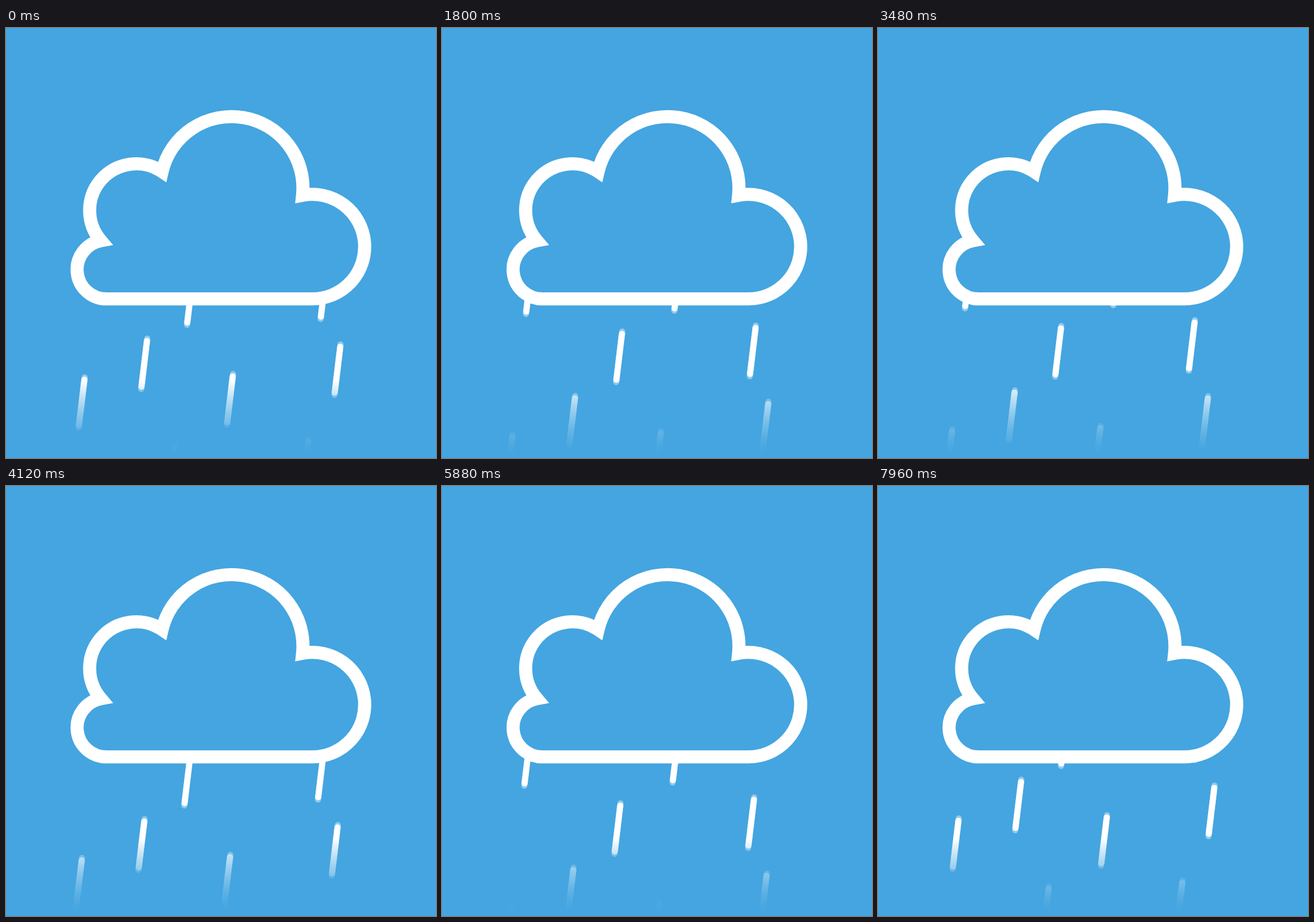
An HTML page for the animation above (8000 ms loop, 732 px wide and 732 px high).

```html
<!DOCTYPE html>
<html lang="en">
<head>
<meta charset="utf-8">
<title>Rain cloud</title>
<style>
  html, body { margin: 0; width: 100%; height: 100%; overflow: hidden; background: #44a5e0; }
  svg { display: block; width: 732px; height: 732px; }
  path { fill: none; stroke: #fff; }
  .drops path { stroke-width: 10.5; stroke-linecap: round; }
  #cloud { stroke-width: 22.3; stroke-miterlimit: 6; }
</style>
</head>
<body>
<svg viewBox="0 0 732 732">
  <defs>
    <clipPath id="below"><rect y="461" width="732" height="271"/></clipPath>
    <linearGradient id="fade" x1="0" y1="0" x2="0" y2="1"></linearGradient>
  </defs>
  <g class="drops" clip-path="url(#below)"></g>
  <rect y="600" width="732" height="125" fill="url(#fade)"/>
  <rect y="725" width="732" height="7" fill="#44a5e0"/>
  <path id="cloud"/>
</svg>
<script>
const NS = 'http://www.w3.org/2000/svg';
const LOOP = 8000, STEP = 40;

// Rain: bursts of five showers, each shower a copy of the same six drops
const CYCLE = 4018, FIRST = 3005, GAP = 771;
const SPEED = 0.378, SLANT = 0.12, LENGTH = 82, CAP = 5.25, SMEAR = 2;
const LEFT = 140.7, SHIFT = [7, 4, 0, 2, 0];
const DROPS = [[0, 0], [106.5, -66], [153.5, 116], [252.5, -5.5], [381, 106], [435.5, -56]];

// Cloud lobes, clockwise: centre x, centre y, radius
const LOBES = [[171, 411.2, 50], [221.7, 310.5, 79.3], [384, 272.3, 121.5], [521.6, 372.2, 89]];

function add(parent, name, attrs = {}) {
  const el = document.createElementNS(NS, name);
  for (const key in attrs) el.setAttribute(key, attrs[key]);
  return parent.appendChild(el);
}

// Outer crossing point of two neighbouring lobes
function crossing([x1, y1, r1], [x2, y2, r2]) {
  const d = Math.hypot(x2 - x1, y2 - y1);
  const ux = (x2 - x1) / d, uy = (y2 - y1) / d;
  const a = (d * d + r1 * r1 - r2 * r2) / (2 * d);
  const h = Math.sqrt(r1 * r1 - a * a);
  return [x1 + ux * a + uy * h, y1 + uy * a - ux * h];
}

function cloudPath() {
  const foot = ([x, y, r]) => [x, y + r];
  let from = foot(LOBES[0]);
  let d = `M${from}`;
  LOBES.forEach((lobe, i) => {
    const next = LOBES[i + 1];
    const to = next ? crossing(lobe, next) : foot(lobe);
    const [x, y, r] = lobe;
    const turn = Math.atan2(to[1] - y, to[0] - x) - Math.atan2(from[1] - y, from[0] - x);
    const sweep = (turn + 4 * Math.PI) % (2 * Math.PI);
    d += `A${r} ${r} 0 ${sweep > Math.PI ? 1 : 0} 1 ${to}`;
    from = to;
  });
  return d + 'Z';
}

// Slanted strokes, lengthened by grow at both ends
function showerPath(grow) {
  const len = LENGTH + 2 * grow;
  return DROPS.map(([x, y]) =>
    `M${x + grow * SLANT} ${y + CAP - grow}l${-len * SLANT} ${len}`).join('');
}

document.getElementById('cloud').setAttribute('d', cloudPath());

const fade = document.getElementById('fade');
for (let u = 0; u <= 1; u += 0.125) {
  add(fade, 'stop', { offset: u, 'stop-color': '#44a5e0', 'stop-opacity': 1 - (1 - u) ** 1.5 });
}

const rain = document.querySelector('.drops');
const showers = [];
for (let cycle = -1; cycle <= 1; cycle++) {
  SHIFT.forEach((shift, i) => {
    const g = add(rain, 'g');
    add(g, 'path', { d: showerPath(SMEAR), opacity: 0.4 });
    add(g, 'path', { d: showerPath(-SMEAR) });
    showers.push({ g, x: LEFT + shift, time: FIRST + cycle * CYCLE + i * GAP });
  });
}

function draw(t) {
  for (const { g, x, time } of showers) {
    const fall = (t - time) * SPEED;
    g.setAttribute('transform', `translate(${x - fall * SLANT} ${500 + fall})`);
  }
}

const start = performance.now();
function tick() {
  const t = (performance.now() - start) % LOOP;
  draw(Math.floor(t / STEP) * STEP);
  requestAnimationFrame(tick);
}
tick();
</script>
</body>
</html>
```
